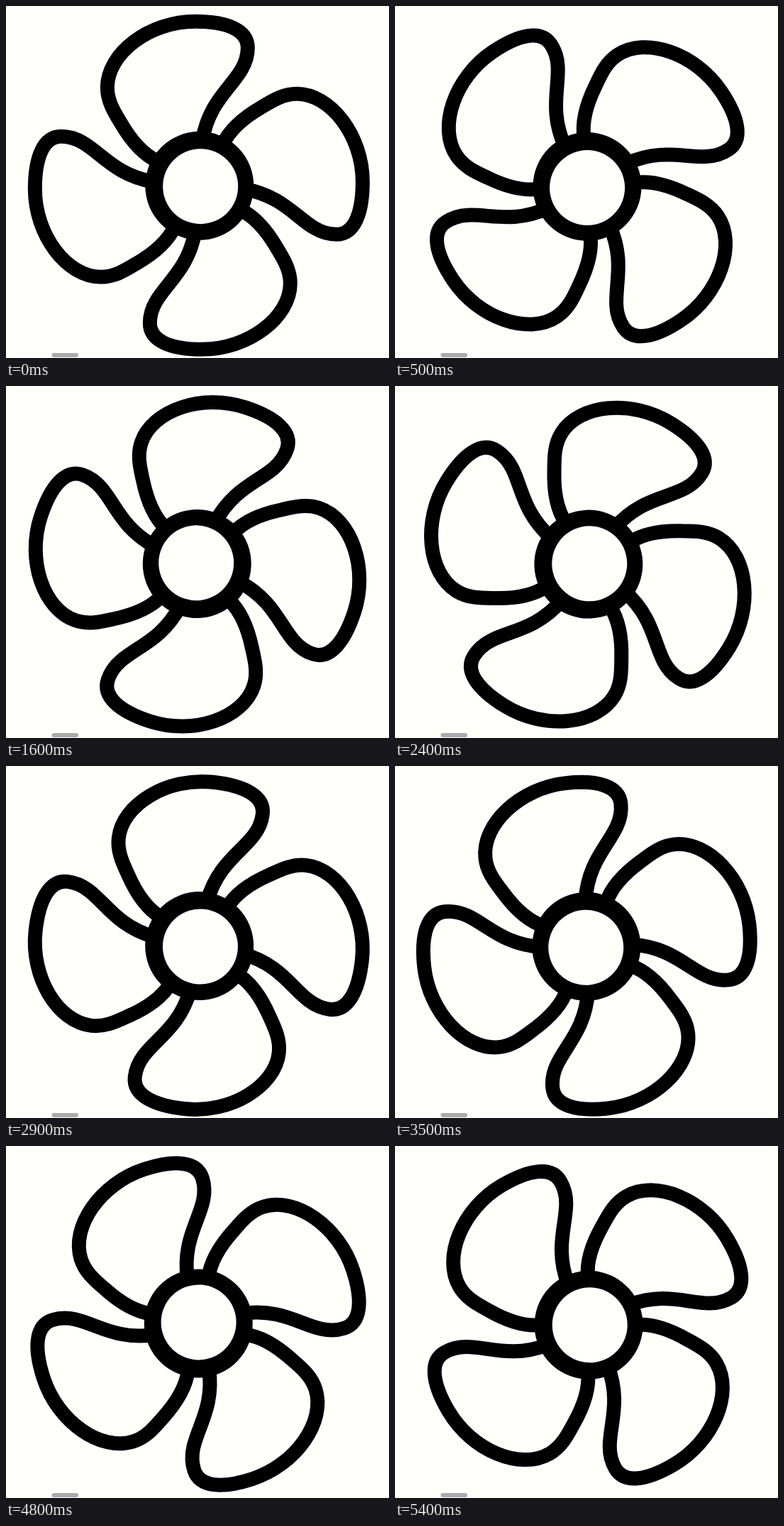
An HTML page with a canvas for the animation above (5.5 s loop, 540 by 496 pixels).

```html
<!DOCTYPE html>
<html lang="en">
<head>
<meta charset="utf-8">
<title>Spinning fan</title>
<style>
  html, body { margin: 0; width: 100%; height: 100%; overflow: hidden; background: #fffffb; }
  canvas { display: block; }
</style>
</head>
<body>
<canvas id="stage" width="540" height="496"></canvas>
<script>
const ctx = document.getElementById('stage').getContext('2d');
const PAPER = '#fffffb', INK = '#000';
const LOOP = 5500, STEP = 100;
const CENTER = { x: 270.8, y: 252.2 };
const RAD = Math.PI / 180;
const TURN = 4.31;          // degrees per tick, three ticks per step
const WOBBLE_DIR = 30 * RAD;

// Centre line of one blade, from the hub's left side round to its front.
const blade = new Path2D(`M-58-34 C-82-45-99-69-110-88
  C-121-106-129-120-129-138 C-129-186-70-231-5-231
  C40-231 69-219 69-194 C69-183 66-173 60-163
  C44-136 14-116 5-64`);

function disc(radius, offset, color) {
  ctx.beginPath();
  ctx.arc(offset * Math.cos(WOBBLE_DIR), offset * Math.sin(WOBBLE_DIR), radius, 0, 2 * Math.PI);
  ctx.fillStyle = color;
  ctx.fill();
}

function drawBlades(offset) {
  ctx.save();
  ctx.translate(offset * Math.cos(WOBBLE_DIR), offset * Math.sin(WOBBLE_DIR));
  ctx.strokeStyle = INK;
  ctx.lineWidth = 20;
  for (let i = 0; i < 4; i++) {
    ctx.stroke(blade);
    ctx.rotate(Math.PI / 2);
  }
  ctx.restore();
}

function drawBar() {
  ctx.beginPath();
  ctx.roundRect(64.5, 489, 37.5, 6, 3);
  ctx.fillStyle = '#aaa';
  ctx.fill();
}

function draw(time) {
  const step = Math.floor((time % LOOP) / STEP);
  const ticks = Math.max(0, 3 * step - 2);

  ctx.fillStyle = PAPER;
  ctx.fillRect(0, 0, 540, 496);

  ctx.save();
  ctx.translate(CENTER.x, CENTER.y);
  ctx.rotate(ticks * TURN * RAD);
  drawBlades(1.2);
  disc(76.5, 2.3, INK);
  disc(53, 3.9, PAPER);
  ctx.restore();

  drawBar();
}

const start = performance.now();
function tick() {
  draw(performance.now() - start);
  requestAnimationFrame(tick);
}
tick();
</script>
</body>
</html>
```
